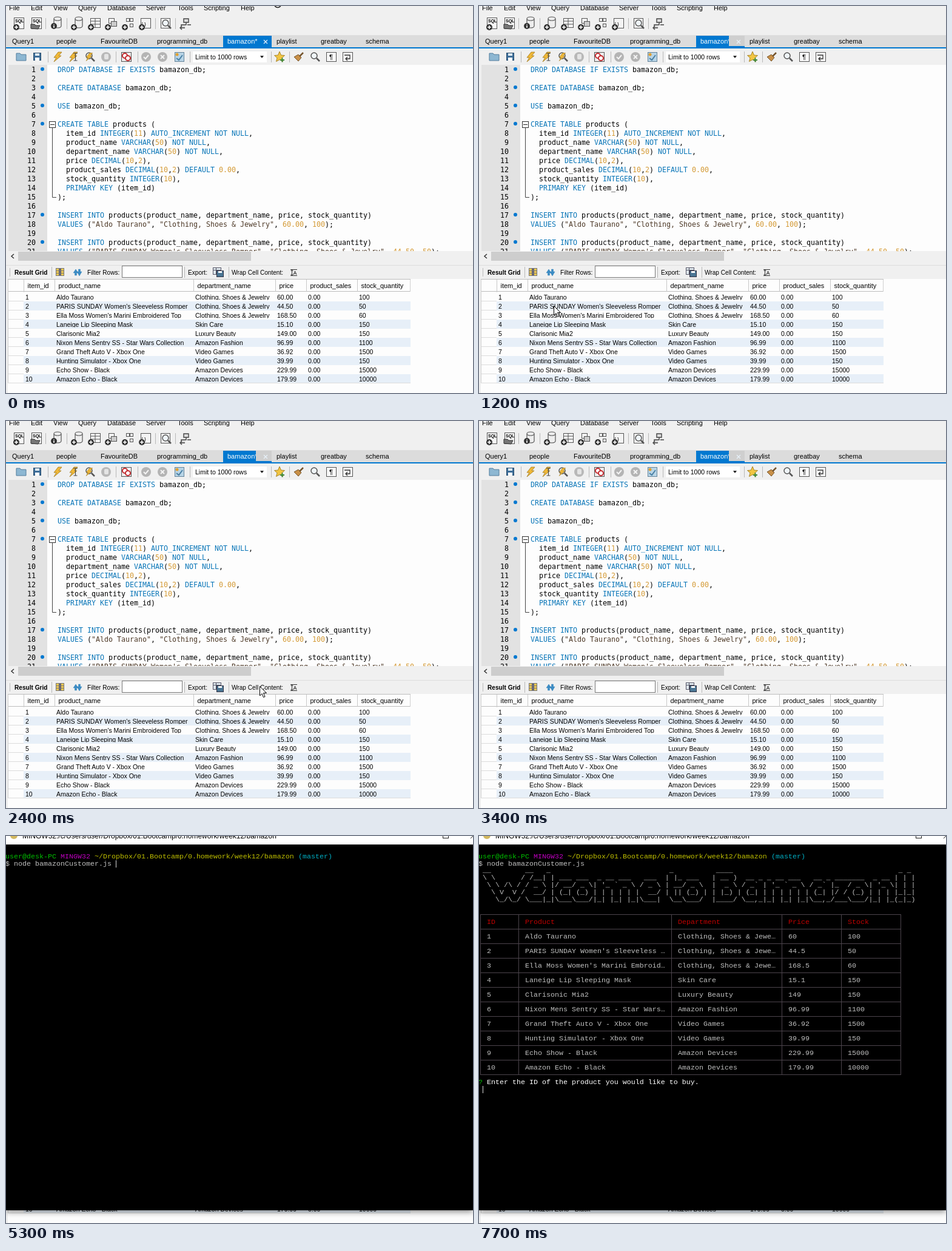
These frames come from a looping animation (770 by 638 pixels, 8 s). An HTML page:

```html
<!DOCTYPE html>
<html lang="en">
<head>
<meta charset="utf-8">
<title>SQL editor and terminal</title>
<style>
  html, body { margin: 0; width: 770px; height: 638px; overflow: hidden; background: #fdfdfd; }
  svg, #term, #banner { position: absolute; left: 0; top: 0; }
  text { white-space: pre; font: 11px "Liberation Sans", Arial, sans-serif; fill: #000; }
  .cell { font-size: 10.5px; }
  .head { font-size: 10.9px; }
  .bar { font-size: 10.1px; }
  .code { font: 11.63px "DejaVu Sans Mono", monospace; }
  .sh, #banner { font: 11.667px/12px "Liberation Mono", monospace; fill: #bfbfbf; color: #bfbfbf; }
  .kw { fill: #0a76b8; }
  .num { fill: #d49a35; }
  .str { fill: #4e3a28; }
  #term { width: 770px; height: 617px; background: #000; box-shadow: 0 2px 10px rgba(0, 0, 0, .5); }
  #banner { left: -1px; top: 51px; margin: 0; }
</style>
</head>
<body>
<svg id="app" width="770" height="638"></svg>
<div id="term">
  <svg id="shell" width="770" height="617"></svg>
<pre id="banner">
 __        __   _                            _          ____                                       _ _
 \ \      / /__| | ___ ___  _ __ ___   ___  | |_ ___   | __ )  __ _ _ __ ___   __ _ _______  _ __ | | |
  \ \ /\ / / _ \ |/ __/ _ \| '_ ` _ \ / _ \ | __/ _ \  |  _ \ / _` | '_ ` _ \ / _` |_  / _ \| '_ \| | |
   \ V  V /  __/ | (_| (_) | | | | | |  __/ | || (_) | | |_) | (_| | | | | | | (_| |/ / (_) | | | |_|_|
    \_/\_/ \___|_|\___\___/|_| |_| |_|\___|  \__\___/  |____/ \__,_|_| |_| |_|\__,_/___\___/|_| |_(_|_)
</pre>
</div>
<script>
const LOOP = 8000;
const BLUE = '#0078d0';
const $ = id => document.getElementById(id);
const esc = s => String(s).replace(/&/g, '&amp;').replace(/</g, '&lt;');
const text = (x, y, s, cls = '', attr = '') =>
  `<text x="${x}" y="${y}" class="${cls}" ${attr}>${esc(s)}</text>`;
const rect = (x, y, w, h, fill, attr = '') =>
  `<rect x="${x}" y="${y}" width="${w}" height="${h}" fill="${fill}" ${attr}/>`;
const box = (x, y, w, h, fill, stroke, attr = '') =>
  rect(x + .5, y + .5, w - 1, h - 1, fill, `stroke="${stroke}" ${attr}`);
const path = (d, stroke, width = 1, fill = 'none', attr = '') =>
  `<path d="${d}" stroke="${stroke}" stroke-width="${width}" fill="${fill}" ${attr}/>`;
const disc = (x, y, r, fill, attr = '') =>
  `<circle cx="${x}" cy="${y}" r="${r}" fill="${fill}" ${attr}/>`;
const group = (id, body) => `<g id="${id}">${body}</g>`;

const products = [
  ['Aldo Taurano', 'Clothing, Shoes & Jewelry', '60.00', 100],
  ["PARIS SUNDAY Women's Sleeveless Romper", 'Clothing, Shoes & Jewelry', '44.50', 50],
  ["Ella Moss Women's Marini Embroidered Top", 'Clothing, Shoes & Jewelry', '168.50', 60],
  ['Laneige Lip Sleeping Mask', 'Skin Care', '15.10', 150],
  ['Clarisonic Mia2', 'Luxury Beauty', '149.00', 150],
  ['Nixon Mens Sentry SS - Star Wars Collection', 'Amazon Fashion', '96.99', 1100],
  ['Grand Theft Auto V - Xbox One', 'Video Games', '36.92', 1500],
  ['Hunting Simulator - Xbox One', 'Video Games', '39.99', 150],
  ['Echo Show - Black', 'Amazon Devices', '229.99', 15000],
  ['Amazon Echo - Black', 'Amazon Devices', '179.99', 10000]
];

// Toolbar icons
const badge = (x, y, sign = 'M-3 0H3M0 -3V3') =>
  disc(x, y, 5, '#333') + path(sign, '#fff', 1.6, 'none', `transform="translate(${x} ${y})"`);
const sheet = x => box(x - 7, 19, 17, 19, '#f8f8f8', '#555') +
  text(x - 5, 27, 'SQL', '', 'style="font-size:7px;font-weight:bold"');
const drum = (x, y) =>
  path(`M${x - 6} ${y - 6}v12a6 3 0 0 0 12 0v-12a6 3 0 0 0-12 0a6 3 0 0 0 12 0`, '#555', 1.2, '#eee');
const grid = x => box(x - 7, 20, 17, 16, '#f4f4f4', '#555') +
  path(`M${x - 7} 25h17M${x - 7} 30h17M${x + 1} 20v16`, '#555');
const lens = (x, y) => disc(x - 1, y - 2, 5, '#eef4f8', 'stroke="#555" stroke-width="1.5"') +
  path(`M${x + 3} ${y + 2}l5 5`, '#555', 2.5);
const bolt = (x, s = 1) =>
  path('M1 -8H7L2 -2H6L-6 8L-2 1H-6Z', '#a07818', .8, '#f0b838', `transform="translate(${x} 84) scale(${s})"`);
const sep = (x, y) => path(`M${x + .5} ${y - 9}v18`, '#b8b8b8');

function topBar() {
  const menu = [[5, 'File'], [41, 'Edit'], [78, 'View'], [119, 'Query'], [167, 'Database'],
    [231, 'Server'], [283, 'Tools'], [326, 'Scripting'], [387, 'Help']];
  const code = text(223, 32, '{ }', '', 'style="font-size:8px"');
  return rect(0, 0, 770, 48, '#f0f0f0') + menu.map(([x, s]) => text(x, 7, s)).join('') +
    sheet(20) + badge(17, 35) + sheet(49) + path('M41 37v-7h6l2 2h7l-3 6z', '#333', 1, '#777') +
    drum(85, 27) + badge(79, 33, 'M0 -1V3M0 -3V-2') + drum(120, 27) + badge(112, 35) +
    grid(146) + badge(140, 35) +
    box(169, 20, 10, 9, '#f4f4f4', '#555') + box(173, 25, 10, 9, '#ccc', '#555') + badge(168, 35) +
    [[198, 20], [204, 20], [204, 29]].map(([x, y]) => box(x, y, 6, 6, '#eee', '#555')).join('') + badge(196, 35) +
    box(222, 20, 17, 17, '#f4f4f4', '#555') + code + badge(224, 35) +
    sep(246, 29) + box(255, 20, 16, 17, '#f4f4f4', '#555') + lens(264, 30) + sep(279, 29) +
    path('M293 21h8v6h-8zM297 27v4h-8v5h6M290 33l-3 3l3 3M299 31h6', '#444', 1.4, '#ddd') + sep(65, 29) + sep(100, 29);
}

function tabs() {
  const names = [[10, 'Query1'], [83, 'people'], [156, 'FavouriteDB'], [249, 'programming_db'],
    [446, 'playlist'], [519, 'greatbay'], [593, 'schema']];
  const cross = path('M425 56l6 6m0-6l-6 6', '#e8f2fa', 1.2);
  return rect(0, 48, 770, 20, '#dcdcdc') + names.map(([x, s]) => text(x, 62, s)).join('') +
    rect(358, 49, 80, 19, BLUE) + text(365, 62, 'bamazon*', '', 'style="fill:#fff"') +
    group('close', rect(412, 49, 26, 17, '#cfcfcf')) + cross;
}

function editBar() {
  const round = (x, d) => disc(x, 84, 8, '#b4b4b4') + path(d, '#f4f4f4', 2);
  return rect(0, 68, 770, 29, '#f0f0f0') + rect(0, 68, 770, 2, BLUE) +
    path('M17 78h6l2 2h8v10h-16z', '#527c9c', 1, '#8db7d2') +
    box(45, 77, 13, 13, '#3d6d98', '#2b4f70') + rect(48, 78, 7, 4, '#dce8f0') + rect(48, 85, 7, 5, '#fff') +
    sep(69, 84) + bolt(85) + bolt(111) + path('M111 78h7m-3.5 0v12m-3 0h6', '#444', 1.2) +
    lens(138, 84) + bolt(137, .8) + disc(165, 84, 8, '#b8b8b8') + rect(162, 79, 7, 9, '#e4e4e4', 'rx="2"') +
    sep(181, 84) + box(190, 76, 17, 16, '#eee', '#555') +
    disc(196, 82, 4, '#fff', 'stroke="#c52c30" stroke-width="2"') +
    disc(201, 86, 4, '#fff', 'stroke="#c52c30" stroke-width="2"') +
    sep(217, 84) + round(231, 'M227 84l3 3l5-6') + round(258, 'M255 81l6 6m0-6l-6 6') +
    box(278, 76, 16, 16, '#b8d4e6', '#64849a') + path('M281 86l4 3l6-8', '#4a80a4', 2) + disc(282, 80, 2.5, '#e0a030') +
    sep(303, 84) + rect(308, 75, 122, 18, '#fff') + text(312, 88, 'Limit to 1000 rows', '', 'style="font-size:10.5px"') +
    path('M419 82h6l-3 4z', 'none', 0, '#222') + sep(437, 84) +
    path('M451 75l2.5 6 6 .5-4.5 4 1.5 6-5.5-3-5.5 3 1.5-6-4.5-4 6-.5z', '#a8862a', 1, '#f2c542') +
    path('M452 89h7m-3.5-3.5v7', '#3f8a3c', 2) + sep(467, 84) +
    path('M475 84l7-4 5 5-5 6z', '#76552d', 1, '#c89048') + path('M484 83l6-6', '#76552d', 2.5) +
    lens(509, 84) + box(528, 76, 17, 16, '#f8f8f8', '#555') + text(533, 88, '¶') +
    box(555, 76, 17, 16, '#f8f8f8', '#555') + path('M558 81h9v6h-7m3-3l-3 3l3 3', '#333', 1.3);
}

const keyword = /^(DROP|DATABASE|IF|EXISTS|CREATE|USE|TABLE|INTEGER|AUTO_INCREMENT|NOT|NULL|VARCHAR|DECIMAL|DEFAULT|PRIMARY|KEY|INSERT|INTO|VALUES)$/;
function paint(line) {
  return line.replace(/"[^"]*"|\w+(\.\d+)?/g, w => {
    const cls = w[0] === '"' ? 'str' : keyword.test(w) ? 'kw' : /^\d/.test(w) ? 'num' : '';
    return cls ? `<tspan class="${cls}">${esc(w)}</tspan>` : w;
  });
}

function editor() {
  const insert = 'INSERT INTO products(product_name, department_name, price, stock_quantity)';
  const values = ([name, dept, price, stock]) => `VALUES ("${name}", "${dept}", ${price}, ${stock});`;
  const lines = ['DROP DATABASE IF EXISTS bamazon_db;', '', 'CREATE DATABASE bamazon_db;', '',
    'USE bamazon_db;', '', 'CREATE TABLE products (', '  item_id INTEGER(11) AUTO_INCREMENT NOT NULL,',
    '  product_name VARCHAR(50) NOT NULL,', '  department_name VARCHAR(50) NOT NULL,',
    '  price DECIMAL(10,2),', '  product_sales DECIMAL(10,2) DEFAULT 0.00,', '  stock_quantity INTEGER(10),',
    '  PRIMARY KEY (item_id)', ');', '', insert, values(products[0]), '', insert, values(products[1])];
  const rows = lines.map((line, i) => {
    const y = 109 + 15 * i;
    const mark = [1, 3, 5, 7, 17, 20].includes(i + 1) ? disc(60, y - 5, 3, BLUE) : '';
    return text(49, y, i + 1, 'code', 'text-anchor="end"') + mark +
      `<text x="85" y="${y}" class="code">${paint(line)}</text>`;
  }).join('');
  return rect(0, 97, 770, 308, '#fdfdfd') + rect(0, 97, 4, 308, '#f0f0f0') + rect(4, 97, 64, 308, '#e2e2e2') + rows +
    path('M76.5 200V315.5H83', '#444') + box(71, 190, 11, 11, '#fff', '#333') + path('M73 195.5h7', '#222');
}

function results() {
  const cols = [[32, 'item_id', 29], [83, 'product_name', 80], [312, 'department_name', 309],
    [447, 'price', 444], [498, 'product_sales', 495], [582, 'stock_quantity', 579]];
  // A strip over each row's foot trims the descenders
  const rows = products.map(([name, dept, price, stock], i) => {
    const y = 472 + 15 * i, fill = i % 2 ? '#e7eff8' : '#fdfdfd';
    const cells = [i + 1, name, dept, price, '0.00', stock];
    return rect(29, y, 638, 15, fill) + cells.map((s, c) => text(cols[c][0], y + 12, s, 'cell')).join('') +
      rect(30, y + 12.6, 637, 2.4, fill) + path(`M4 ${y + 14.5}h25`, '#dcdcdc');
  }).join('');
  return rect(0, 404, 770, 46, '#f0f0f0') + rect(20, 405, 384, 15, '#cdcdcd') + path('M13 409l-4 3.5l4 3.5', '#333', 1.5) +
    path('M0 427.5h770', '#dcdcdc') + path('M6.5 432v14', '#bbb') +
    text(14, 443, 'Result Grid', 'bar', 'style="font-weight:bold"') +
    box(82, 432, 14, 13, '#f0c850', '#777') + rect(87, 433, 4, 11, '#667') + path('M82 436.5h14M82 440.5h14', '#777') +
    sep(75, 439) +
    path('M111 440l4-6l4 6h-2.5v4h-3v-4zM117 438h2.5v-4h3v4h2.5l-4 7z', '#3080b8', .5, '#3c8cc4') +
    text(134, 443, 'Filter Rows:', 'bar') + box(191, 428, 100, 20, '#fff', '#7a7a7a', 'id="filter"') +
    sep(294, 439) + text(300, 443, 'Export:', 'bar') + box(341, 431, 14, 12, '#dfe8ee', '#556') +
    path('M341 435.5h14M346.5 431v12', '#556') + box(347, 436, 12, 11, '#4b7694', '#334') + rect(350, 437, 6, 3, '#fff') +
    sep(367, 439) + text(372, 443, 'Wrap Cell Content:', 'bar') +
    path('M469 434.5h11M469 444.5h11M471.5 435v9m-2-7l2-2l2 2m-4 5l2 2l2-2M474 443l2.5-6l2.5 6m-4-2h3', '#333') +
    rect(0, 450, 770, 188, '#fdfdfd') + rect(0, 450, 3, 188, '#f0f0f0') + path('M3 450.5h664M3 470.5h664', '#bdbdbd') +
    cols.map(([x, s, line]) => text(x + 3.5, 465, s, 'head') + path(`M${line + .5} 451v20`, '#c8c8c8')).join('') +
    path('M666.5 451v20M3.5 451v170M29.5 471v150', '#d0d0d0') + rows + path('M3 621.5h664', '#dcdcdc');
}

$('app').innerHTML = topBar() + tabs() + editBar() + editor() + results() +
  group('busy', disc(448, -3, 5.5, 'none', 'stroke="#222" stroke-width="1.5"')) +
  group('arrow', path('M.5 .5V16L4 12.5L6.5 18.5L9 17.5L6.5 11.5H11.5Z', '#000', 1, '#fff'));

// Terminal
const col = i => 7 * i - 1;
const sh = (i, y, s, fill = '#bfbfbf') => text(col(i), y, s, 'sh', `style="fill:${fill}"`);
const cut = (s, n) => s.length > n ? s.slice(0, n - 1) + '…' : s;

function stockTable() {
  const edges = [2.5, 65.5, 317.5, 499.5, 597.5, 695.5], starts = [2, 11, 47, 73, 87];
  const rows = [['ID', 'Product', 'Department', 'Price', 'Stock'],
    ...products.map(([name, dept, price, stock], i) => [i + 1, cut(name, 33), cut(dept, 23), +price, stock])];
  const lines = edges.map(x => `M${x} 129V394`).join('') +
    Array.from({ length: 12 }, (_, i) => `M2 ${129.5 + 24 * i}H696`).join('');
  return path(lines, '#4c444c') + rows.map((row, r) =>
    row.map((s, c) => sh(starts[c], 145 + 24 * r, s, r ? '#bfbfbf' : '#bf0000')).join('')).join('');
}

const dir = 'Dropbox/01.Bootcamp/0.homework/week12/bamazon';
$('shell').innerHTML = rect(0, 0, 770, 14, '#fff') + disc(13, -1, 6, '#d2b860') +
  text(27, 4, 'MINGW32:/c/Users/user/' + dir, '', 'style="font-size:12px"') +
  box(720, -5, 10, 9, 'none', '#222') + path('M766 4l9-9m-9 0l9 9', '#222') +
  sh(0, 37, 'user@desk-PC', '#00bf00') + sh(13, 37, 'MINGW32', '#bf00bf') +
  sh(21, 37, '~/' + dir, '#bfbf00') + sh(69, 37, '(master)', '#00afc4') + sh(0, 49, '$') +
  group('word', sh(2, 49, 'node')) + group('command', sh(7, 49, 'bamazonCustomer.js')) +
  group('stock', stockTable() + sh(0, 409, '?', '#00bf00') +
    sh(2, 409, 'Enter the ID of the product you would like to buy.', '#fff')) +
  group('caret', rect(0, 0, 1, 12, '#d8d8d8'));

// Every state holds until the next one
function hold(id, states) {
  const frames = states.map(([ms, props]) => ({ offset: ms / LOOP, easing: 'step-end', ...props }));
  frames.push({ ...frames[frames.length - 1], offset: 1 });
  $(id).animate(frames, { duration: LOOP, iterations: Infinity });
}
const on = { opacity: 1 }, off = { opacity: 0, transform: 'none' };
const at = (x, y) => ({ opacity: 1, transform: `translate(${x}px, ${y}px)` });
const showFrom = (id, ms) => hold(id, [[0, off], [ms, { ...on, transform: 'none' }]]);

showFrom('close', 200);
showFrom('term', 4100);
showFrom('word', 5100);
showFrom('command', 5300);
showFrom('banner', 6500);
showFrom('stock', 6600);
hold('busy', [[0, on], [100, { opacity: 0 }]]);
hold('filter', [[0, { stroke: '#7a7a7a' }], [2600, { stroke: BLUE }], [2800, { stroke: '#7a7a7a' }]]);
hold('caret', [[0, off], [4100, at(13, 40)], [4600, off], [5100, at(48, 40)], [5300, at(181, 40)],
  [5700, off], [6600, at(6, 412)], [7100, off], [7700, at(6, 412)]]);

// Pointer position every 100 ms, then a rest before it leaves on the right
const trail = [[450, 22], [428, 57], [464, 96], [395, 215], [285, 310], [190, 368], [167, 375], [240, 270], [340, 131],
  [280, 250], [185, 395], [123, 494], [100, 532], [80, 558], [65, 574], [54, 583], [47, 587], [44, 588],
  [60, 580], [115, 555], [205, 515], [300, 475], [370, 450], [418, 437], [446, 430], [240, 432], [44, 401]];
hold('arrow', [[0, off], ...trail.map(([x, y], i) => [100 * (i + 1), at(x, y)]),
  [3200, at(330, 470)], [3300, at(758, 524)], [3400, off]]);
</script>
</body>
</html>
```
